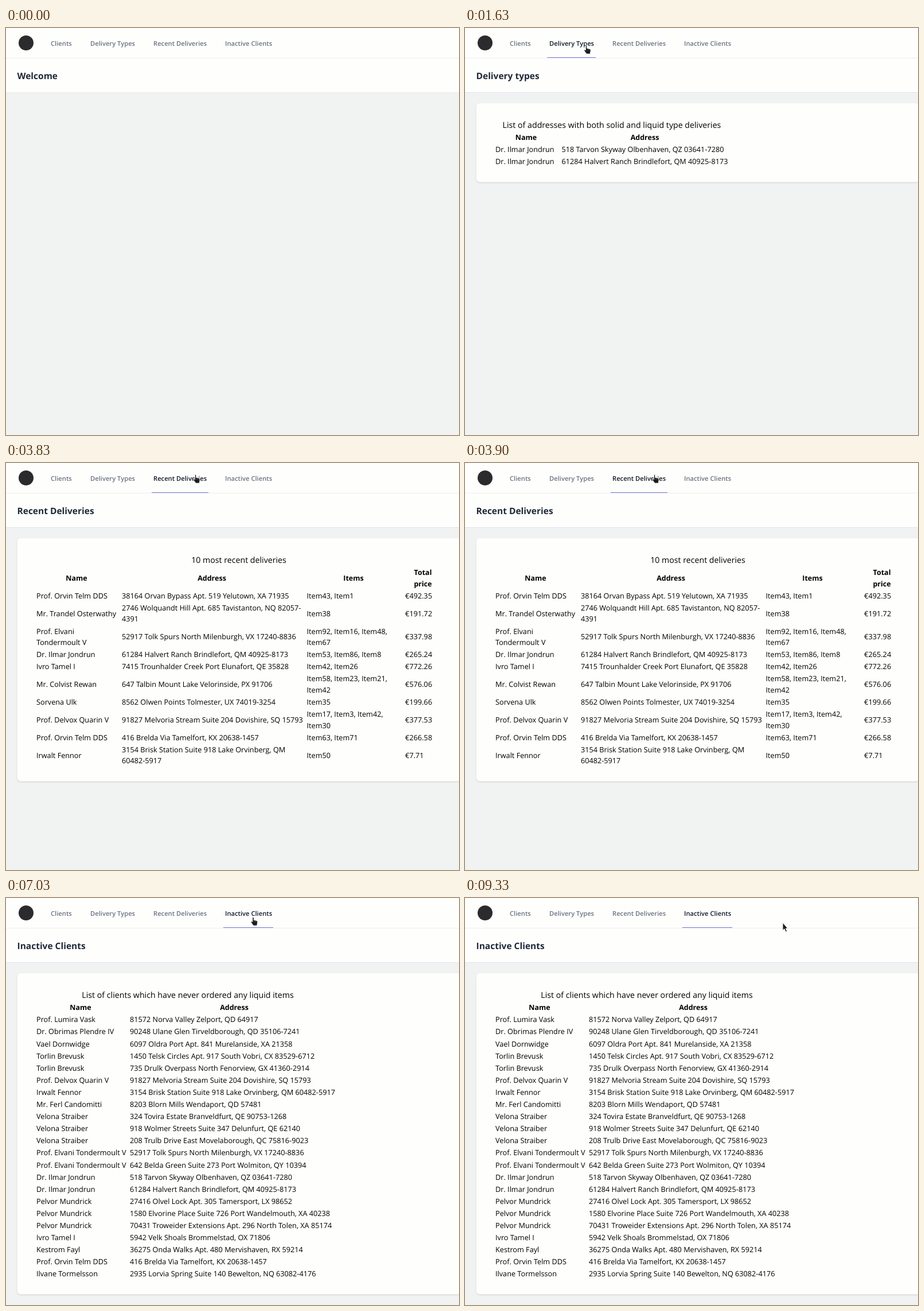
Write an HTML page that moves like this. It is 790 px wide and 709 px high and loops after 9.56 s.

```html
<!DOCTYPE html>
<html lang="en">
<head>
<meta charset="utf-8">
<title>Deliveries</title>
<style>
  html, body { margin: 0; width: 100%; height: 100%; overflow: hidden; background: #f1f3f3; }
  svg { display: block; }
  text { font: 12.7px "Open Sans", "Noto Sans", sans-serif; text-rendering: geometricPrecision; white-space: pre; }
  .mid { text-anchor: middle; }
  .th { font-size: 12.5px; font-weight: 700; }
  .caption { font-size: 14.2px; }
  .title { font-size: 15.5px; font-weight: 700; fill: #1f2937; }
  .link { font-size: 11.2px; font-weight: 600; }
  .card { fill: #fefefd; filter: drop-shadow(0 1px 1.2px rgba(0, 0, 0, .15)); }
</style>
</head>
<body>
<svg id="stage" width="790" height="709" viewBox="0 0 790 709"></svg>
<script>
const LOOP = 9560;
const LINE = 19.5, GAP = 1.6, TABLE_TOP = 180.9;
const stage = document.getElementById('stage');

function add(parent, tag, attrs, content) {
  const el = document.createElementNS('http://www.w3.org/2000/svg', tag);
  for (const key in attrs) el.setAttribute(key, attrs[key]);
  if (content) el.textContent = content;
  parent.appendChild(el);
  return el;
}
const rect = (parent, x, y, width, height, fill) => add(parent, 'rect', { x, y, width, height, fill });
const label = (parent, x, y, cls, content) => add(parent, 'text', { x, y, class: cls }, content);
const show = (el, on) => el.setAttribute('visibility', on ? 'visible' : 'hidden');

// people and places that occur in more than one table
const who = {
  ilmar: 'Dr. Ilmar Jondrun',
  orvin: 'Prof. Orvin Telm DDS',
  elvani: 'Prof. Elvani Tondermoult V',
  ivro: 'Ivro Tamel I',
  delvox: 'Prof. Delvox Quarin V',
  irwalt: 'Irwalt Fennor',
  torlin: 'Torlin Brevusk',
  velona: 'Velona Straiber',
  pelvor: 'Pelvor Mundrick'
};
const at = {
  skyway: '518 Tarvon Skyway Olbenhaven, QZ 03641-7280',
  ranch: '61284 Halvert Ranch Brindlefort, QM 40925-8173',
  spurs: '52917 Tolk Spurs North Milenburgh, VX 17240-8836',
  stream: '91827 Melvoria Stream Suite 204 Dovishire, SQ 15793',
  via: '416 Brelda Via Tamelfort, KX 20638-1457',
  station: '3154 Brisk Station Suite 918 Lake Orvinberg, QM 60482-5917'
};

// a "|" in a cell marks a line break
const pages = [
  { from: 0, title: 'Welcome' },
  {
    from: 1500, title: 'Delivery types', link: 1, bottom: 269,
    caption: ['List of addresses with both solid and liquid type deliveries', 256],
    heads: [['Name', 106.5], ['Address', 313.5]],
    cols: [53, 168.5],
    rows: [[who.ilmar, at.skyway], [who.ilmar, at.ranch]]
  },
  {
    from: 3670, title: 'Recent Deliveries', link: 2, bottom: 555,
    caption: ['10 most recent deliveries', 406],
    heads: [['Name', 123], ['Address', 359], ['Items', 606], ['Total|price', 727]],
    cols: [53, 202, 524.5, 696],
    rows: [
      [who.orvin, '38164 Orvan Bypass Apt. 519 Yelutown, XA 71935', 'Item43, Item1', '€492.35'],
      ['Mr. Trandel Osterwathy', '2746 Wolquandt Hill Apt. 685 Tavistanton, NQ 82057-|4391', 'Item38', '€191.72'],
      [who.elvani.replace(' T', '|T'), at.spurs, 'Item92, Item16, Item48,|Item67', '€337.98'],
      [who.ilmar, at.ranch, 'Item53, Item86, Item8', '€265.24'],
      [who.ivro, '7415 Trounhalder Creek Port Elunafort, QE 35828', 'Item42, Item26', '€772.26'],
      ['Mr. Colvist Rewan', '647 Talbin Mount Lake Velorinside, PX 91706', 'Item58, Item23, Item21,|Item42', '€576.06'],
      ['Sorvena Ulk', '8562 Olwen Points Tolmester, UX 74019-3254', 'Item35', '€199.66'],
      [who.delvox, at.stream, 'Item17, Item3, Item42,|Item30', '€377.53'],
      [who.orvin, at.via, 'Item63, Item71', '€266.58'],
      [who.irwalt, at.station.replace('QM ', 'QM|'), 'Item50', '€7.71']
    ]
  },
  {
    from: 6830, title: 'Inactive Clients', link: 3, bottom: 691,
    caption: ['List of clients which have never ordered any liquid items', 317],
    heads: [['Name', 130], ['Address', 398]],
    cols: [53, 216],
    rows: [
      ['Prof. Lumira Vask', '81572 Norva Valley Zelport, QD 64917'],
      ['Dr. Obrimas Plendre IV', '90248 Ulane Glen Tirveldborough, QD 35106-7241'],
      ['Vael Dornwidge', '6097 Oldra Port Apt. 841 Murelanside, XA 21358'],
      [who.torlin, '1450 Telsk Circles Apt. 917 South Vobri, CX 83529-6712'],
      [who.torlin, '735 Drulk Overpass North Fenorview, GX 41360-2914'],
      [who.delvox, at.stream],
      [who.irwalt, at.station],
      ['Mr. Ferl Candomitti', '8203 Blorn Mills Wendaport, QD 57481'],
      [who.velona, '324 Tovira Estate Branveldfurt, QE 90753-1268'],
      [who.velona, '918 Wolmer Streets Suite 347 Delunfurt, QE 62140'],
      [who.velona, '208 Trulb Drive East Movelaborough, QC 75816-9023'],
      [who.elvani, at.spurs],
      [who.elvani, '642 Belda Green Suite 273 Port Wolmiton, QY 10394'],
      [who.ilmar, at.skyway],
      [who.ilmar, at.ranch],
      [who.pelvor, '27416 Olvel Lock Apt. 305 Tamersport, LX 98652'],
      [who.pelvor, '1580 Elvorine Place Suite 726 Port Wandelmouth, XA 40238'],
      [who.pelvor, '70431 Troweider Extensions Apt. 296 North Tolen, XA 85174'],
      [who.ivro, '5942 Velk Shoals Brommelstad, OX 71806'],
      ['Kestrom Fayl', '36275 Onda Walks Apt. 480 Mervishaven, RX 59214'],
      [who.orvin, at.via],
      ['Ilvane Tormelsson', '2935 Lorvia Spring Suite 140 Bewelton, NQ 63082-4176']
    ]
  }
];

// name, text x, underline from, underline to
const links = [
  ['Clients', 78, 75, 118],
  ['Delivery Types', 147, 143.5, 228],
  ['Recent Deliveries', 257, 254, 353],
  ['Inactive Clients', 382, 379, 466]
];

function drawRow(group, cells, xs, top, cls) {
  const split = cells.map(cell => cell.split('|'));
  const height = LINE * Math.max(...split.map(lines => lines.length));
  split.forEach((lines, c) => lines.forEach((line, i) => {
    const centre = top + height / 2 + (i - (lines.length - 1) / 2) * LINE;
    label(group, xs[c], centre + 4.6, cls, line);
  }));
  return top + height + GAP;
}

function drawPage(page) {
  const group = add(stage, 'g', {});
  rect(group, 0, 112, 790, 1, page.rows ? '#dfe0ee' : '#ebeeee');
  label(group, 19.5, 88.5, 'title', page.title);
  if (page.rows) {
    add(group, 'rect', { x: 19.5, y: 131, width: 773.5, height: page.bottom - 131.5, rx: 6.5, class: 'card' });
    label(group, page.caption[1], 174, 'caption mid', page.caption[0]);
    let y = drawRow(group, page.heads.map(h => h[0]), page.heads.map(h => h[1]), TABLE_TOP, 'th mid');
    for (const row of page.rows) y = drawRow(group, row, page.cols, y, '');
  }
  return group;
}

rect(stage, 0, 0, 790, 709, '#f1f3f3');
rect(stage, 0, 0, 790, 112, '#fefefd');
rect(stage, 0, 52, 790, 1, '#efefec');
add(stage, 'circle', { cx: 35, cy: 26, r: 13, fill: '#2b2b2d' });

const groups = pages.map(drawPage);
const nav = links.map(([name, x, left, right]) => ({
  left, right,
  text: label(stage, x, 31, 'link', name),
  bar: rect(stage, left, 51, right - left, 1, '#d1d5db')
}));

const pointer = add(stage, 'g', {});
const outline = { fill: '#1c1c1f', stroke: '#fff', 'stroke-width': 1, 'stroke-linejoin': 'round' };
const arrow = add(pointer, 'path', { ...outline, d: 'M0 0V13.5L3 10.8L5.2 16L7.6 15L5.4 10H9Z' });
const hand = add(pointer, 'g', {});
add(hand, 'path', {
  ...outline,
  d: 'M-1.2 1Q0 -.6 1.3 1V5.3L6.2 6.4Q8.1 7 7.8 9.4L6.7 15.2H.4L-3.6 9.6Q-4.2 7.6-2.5 7.6L-1.2 8.6Z'
});
add(hand, 'path', { d: 'M1.6 7V9M3.7 7.5V9.3M5.7 8V9.6', stroke: '#77777c', 'stroke-width': .6 });

// time, x and y of the pointer's tip
const track = [
  [30, 4, 1], [970, 211.5, 30], [1900, 211.5, 30], [2600, 332, 20], [2900, 332, 20],
  [3000, 330.5, 20], [4600, 330.5, 20], [5200, 426, 33], [5740, 426, 33], [5830, 431, 33],
  [8400, 431, 33], [8850, 559, 30], [9000, 551, 45], [9140, 551, 45], [9330, 554, 43],
  [LOOP, 554, 43]
];

function tipAt(t) {
  const i = Math.max(1, track.findIndex(k => k[0] > t));
  const [t0, x0, y0] = track[i - 1], [t1, x1, y1] = track[i];
  const p = Math.max(0, (t - t0) / (t1 - t0));
  const e = p * p * (3 - 2 * p);
  return [x0 + (x1 - x0) * e, y0 + (y1 - y0) * e];
}

function render(t) {
  const current = pages.filter(p => p.from <= t).pop();
  groups.forEach((group, i) => show(group, pages[i] === current));

  const present = t >= track[0][0];
  const [x, y] = tipAt(t);
  let overLink = false;
  nav.forEach((item, i) => {
    const active = current.link === i;
    const hover = present && y < 52 && x >= item.left && x <= item.right;
    overLink = overLink || hover;
    item.text.setAttribute('fill', active ? '#111827' : hover ? '#374151' : '#6b7280');
    item.bar.setAttribute('fill', active ? '#7479e0' : '#d1d5db');
    show(item.bar, active || hover);
  });

  pointer.setAttribute('transform', `translate(${Math.round(x * 2) / 2} ${Math.round(y)})`);
  show(arrow, present && !overLink);
  show(hand, present && overLink);
}

const start = performance.now();
function tick() {
  render((performance.now() - start) % LOOP);
  requestAnimationFrame(tick);
}
tick();
</script>
</body>
</html>
```
